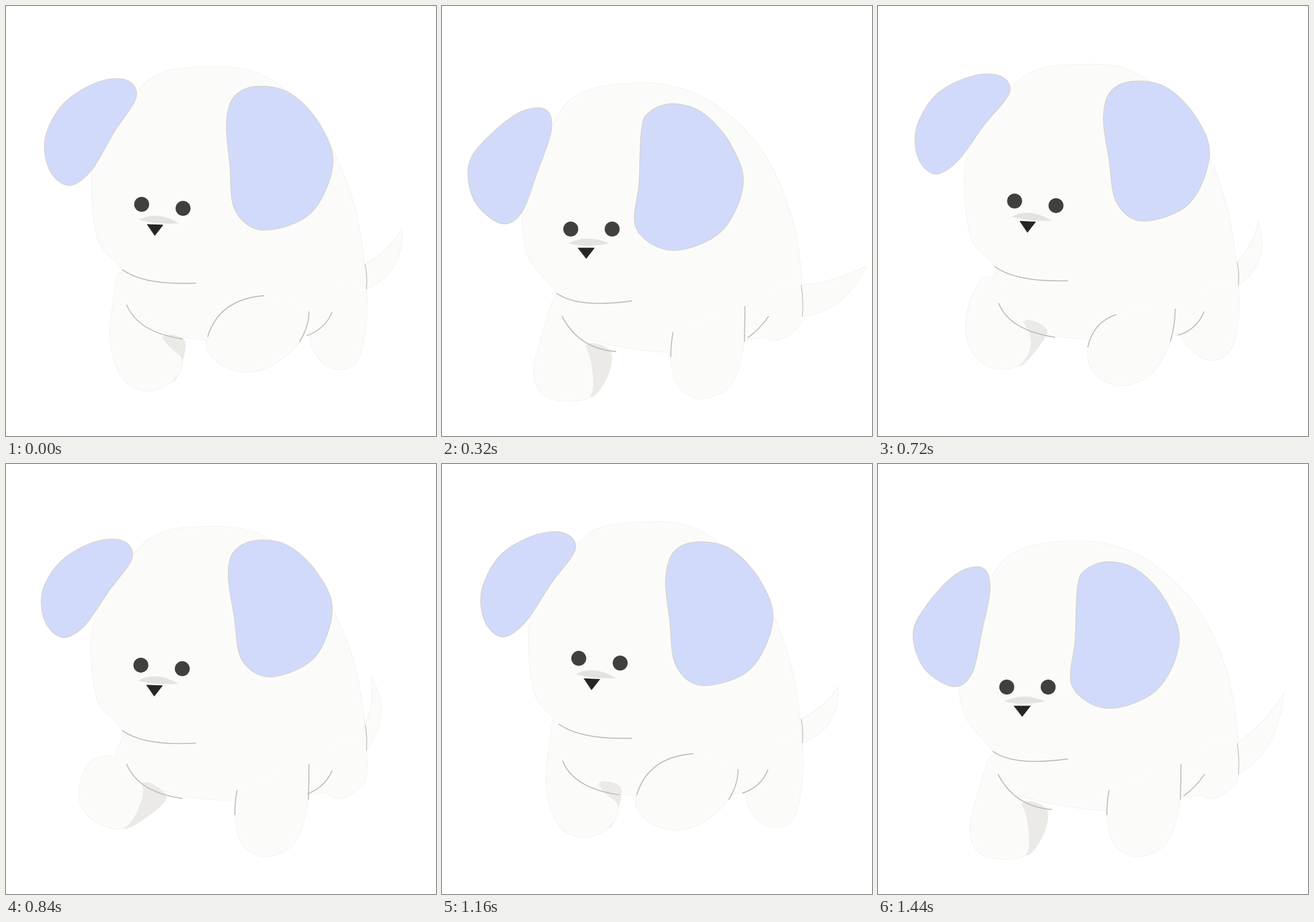
These frames come from a looping animation (748 px wide and 748 px high, 1.48 s). An HTML page with a canvas:

```html
<!DOCTYPE html>
<html lang="en">
<head>
<meta charset="utf-8">
<title>Walking puppy</title>
<style>
  html, body { margin: 0; width: 100%; height: 100%; overflow: hidden; background: #fff; }
  canvas { display: block; }
</style>
</head>
<body>
<canvas id="stage" width="748" height="748"></canvas>
<script>
const ctx = document.getElementById('stage').getContext('2d');
const LOOP = 1480, STEP = 40, STRIDE = 570, HELD = [40, 1040];
const FUR = '#fbfcf9', EDGE = '#eeefec', LINE = '#bfbfbb', SOLE = '#ebeae6';
const EAR = '#d2dafc', EAR_EDGE = '#d5d3cd', EYE = '#42403d', NOSE = '#262524';

// Outlines as x, y pairs: head high and head low.
const body = [
  [340,106, 450,122, 548,218, 605,345, 627,500, 612,560, 530,573, 350,581, 240,553, 192,508,
   203,460, 160,405, 150,290, 177,222, 250,128],
  [340,134, 450,157, 548,240, 606,360, 626,490, 612,562, 532,580, 395,602, 240,575, 194,535,
   200,500, 150,435, 141,345, 165,272, 225,162]
];
const rightEar = [
  [381,205, 396,160, 437,143, 495,157, 545,212, 567,285, 525,370, 440,397, 392,360, 385,280],
  [347,215, 360,185, 400,170, 452,185, 500,237, 524,310, 485,393, 400,425, 338,387, 343,305]
];
const leftEar = [
  [227,158, 207,128, 155,134, 97,172, 66,232, 74,288, 108,315, 147,289, 187,222],
  [195,215, 180,180, 135,192, 85,245, 61,295, 80,355, 130,387, 163,365, 181,290]
];
// Right leg: planted, lifted.
const rightLeg = [
  [402,568, 399,588, 398,610, 410,660, 450,683, 503,658, 526,583, 527,523],
  [448,504, 385,525, 351,575, 358,610, 405,636, 460,626, 511,583, 527,532]
];
// Left leg: hanging, raised, planted. The last two points belong to the sole.
const leftLeg = [
  [203,465, 186,520, 182,588, 203,648, 246,670, 290,652, 306,615, 272,578, 309,580, 309,612],
  [190,510, 145,520, 127,570, 137,605, 165,627, 205,633, 230,600, 236,556, 279,577, 255,607],
  [203,505, 175,570, 160,635, 175,675, 215,687, 257,679, 262,640, 250,592, 293,600, 288,645]
];
// Curves as start, control, end: head high and head low.
const creases = [
  [[203,459, 240,486, 330,482], [200,500, 236,526, 330,513]],
  [[210,520, 230,568, 307,579], [209,540, 238,596, 302,601]],
  [[567,533, 555,562, 524,573], [568,540, 553,562, 532,577]]
];
const muzzle = [[231,372, 262,355, 301,378, 265,381], [219,413, 254,396, 291,413, 254,421]];
const nose = [[246,380, 273,381, 259,399], [237,421, 265,421, 251,439]];
const eyes = [[236,345, 308,352], [224,388, 296,388]];

const mix = (a, b, k) => a + (b - a) * k;
const blend = ([a, b], k) => a.map((v, i) => mix(v, b[i], k));
const shift = (p, dx, dy) => p.map((v, i) => v + (i % 2 ? dy : dx));

function ramp(p, start, end) {
  const x = Math.min(1, Math.max(0, (p - start) / (end - start)));
  return x * x * (3 - 2 * x);
}

// Turns and scales an outline about one of its own points.
function turn(p, pivot, degrees, scale) {
  const a = degrees * Math.PI / 180, c = Math.cos(a) * scale, s = Math.sin(a) * scale;
  const px = p[2 * pivot], py = p[2 * pivot + 1], out = [];
  for (let i = 0; i < p.length; i += 2) {
    const x = p[i] - px, y = p[i + 1] - py;
    out.push(px + x * c - y * s, py + x * s + y * c);
  }
  return out;
}

// Smooth closed curve through the points.
function ring(p) {
  const n = p.length / 2, path = new Path2D();
  const at = i => { const j = (i + n) % n * 2; return [p[j], p[j + 1]]; };
  path.moveTo(...at(0));
  for (let i = 0; i < n; i++) {
    const [a, b, c, d] = [at(i - 1), at(i), at(i + 1), at(i + 2)];
    path.bezierCurveTo(b[0] + (c[0] - a[0]) / 6, b[1] + (c[1] - a[1]) / 6,
      c[0] - (d[0] - b[0]) / 6, c[1] - (d[1] - b[1]) / 6, c[0], c[1]);
  }
  return path;
}

function arc(x, y, cx, cy, ex, ey, backX, backY) {
  const path = new Path2D();
  path.moveTo(x, y);
  path.quadraticCurveTo(cx, cy, ex, ey);
  if (backX) path.quadraticCurveTo(backX, backY, x, y);
  return path;
}

// Crescent from the rump to a tip at the given angle.
function tailShape(degrees, dip) {
  const a = degrees * Math.PI / 180, sin = Math.sin(a), cos = Math.cos(a);
  const tip = [625 + 120 * cos, 490 - 120 * sin];
  const top = mix(450, 486, dip), bottom = mix(492, 539, dip);
  const bend = (y, bulge) => [(625 + tip[0]) / 2 + bulge * sin, (y + tip[1]) / 2 + bulge * cos];
  const path = arc(625, top, ...bend(top, 12), ...tip);
  path.quadraticCurveTo(...bend(bottom, 42), 627, bottom);
  return { path, root: arc(625, top, 629, (top + bottom) / 2, 627, bottom) };
}

function fill(path, color) {
  ctx.fillStyle = color;
  ctx.fill(path);
}

function stroke(path, color = LINE, width = 1.8) {
  ctx.strokeStyle = color;
  ctx.lineWidth = width;
  ctx.stroke(path);
}

function draw(t) {
  const p = t / STRIDE % 1;
  const r = (start, end) => ramp(p, start, end);

  // Motion over one stride, which begins with the right paw in the air.
  const hop = r(0, .03) - r(.2, .45);
  const dip = r(.46, .525) - r(.754, .98) - .16 * hop;
  const earLift = .25 + .75 * r(.05, .46) - r(.474, .526) + .25 * r(.754, .98);
  const earSwing = 6 * (r(.05, .46) - r(.474, .526)) + 8 * (r(.526, .561) - r(.58, .72));
  const leftStep = r(.05, .46) + r(.48, .526) + r(.561, .8);
  const rightLift = 1 - r(.1, .42) + r(.6, .92);
  const rightShift = 12 * (r(.6, .754) - r(.754, .98) - hop);
  const rear = 632 - 50 * (r(.15, .45) - r(.76, .97));
  const tailAngle = 58 + 27 * r(.05, .46) - 70 * r(.474, .575) + 62 * r(.754, .98) - 19 * r(.98, 1);

  const tail = tailShape(tailAngle, dip);
  const right = shift(blend(rightLeg, rightLift), rightShift, 0);
  const step = Math.floor(leftStep);
  const left = shift(blend([leftLeg[step % 3], leftLeg[(step + 1) % 3]], leftStep - step), 0, -20 * hop);
  const sole = ring([...left.slice(14), ...left.slice(10, 12)]);
  const rearLeg = [531,568, 543,rear - 20, 577,rear, 612,rear - 17, 627,540, 620,480, 570,500];
  const back = [tail.path, ring(blend(body, dip)), ring(rearLeg)];
  const front = [ring(left.slice(0, 16)), ring(right)];

  ctx.fillStyle = '#fff';
  ctx.fillRect(0, 0, 748, 748);
  ctx.lineCap = ctx.lineJoin = 'round';
  for (const shape of [...back, ...front]) stroke(shape, EDGE, 1.6);
  for (const shape of back) fill(shape, FUR);
  fill(sole, SOLE);
  for (const shape of front) fill(shape, FUR);

  const [x0, y0, x1, y1, x2, y2] = right, [hipX, hipY] = right.slice(14), [kneeX, kneeY] = right.slice(12);
  stroke(arc(x0, y0, 2 * x1 - (x0 + x2) / 2, 2 * y1 - (y0 + y2) / 2, x2, y2));
  stroke(arc(hipX, hipY, hipX, (hipY + kneeY) / 2, kneeX, kneeY));
  stroke(tail.root, LINE, 1.3);
  for (const crease of creases) stroke(arc(...blend(crease, dip)));

  const scale = 1 - .06 * earLift;
  const ears = [
    turn(blend(leftEar, dip), 1, earSwing, scale),
    shift(turn(blend(rightEar, dip), 2, -6 * earLift, scale), 0, -13 * earLift)
  ];
  for (const ear of ears.map(ring)) {
    fill(ear, EAR);
    stroke(ear, EAR_EDGE, 1.4);
  }

  fill(arc(...blend(muzzle, dip)), '#e3e3e0');
  const n = blend(nose, dip), e = blend(eyes, dip);
  const snout = new Path2D(`M${n[0]} ${n[1]}L${n[2]} ${n[3]}L${n[4]} ${n[5]}Z`);
  fill(snout, NOSE);
  stroke(snout, NOSE, 1);
  for (const j of [0, 2]) {
    const eye = new Path2D();
    eye.arc(e[j], e[j + 1], 13, 0, 2 * Math.PI);
    fill(eye, EYE);
  }
}

function tick() {
  const t = Math.floor(performance.now() % LOOP / STEP) * STEP;
  draw(HELD.includes(t) ? t - STEP : t);
  requestAnimationFrame(tick);
}
tick();
</script>
</body>
</html>
```
